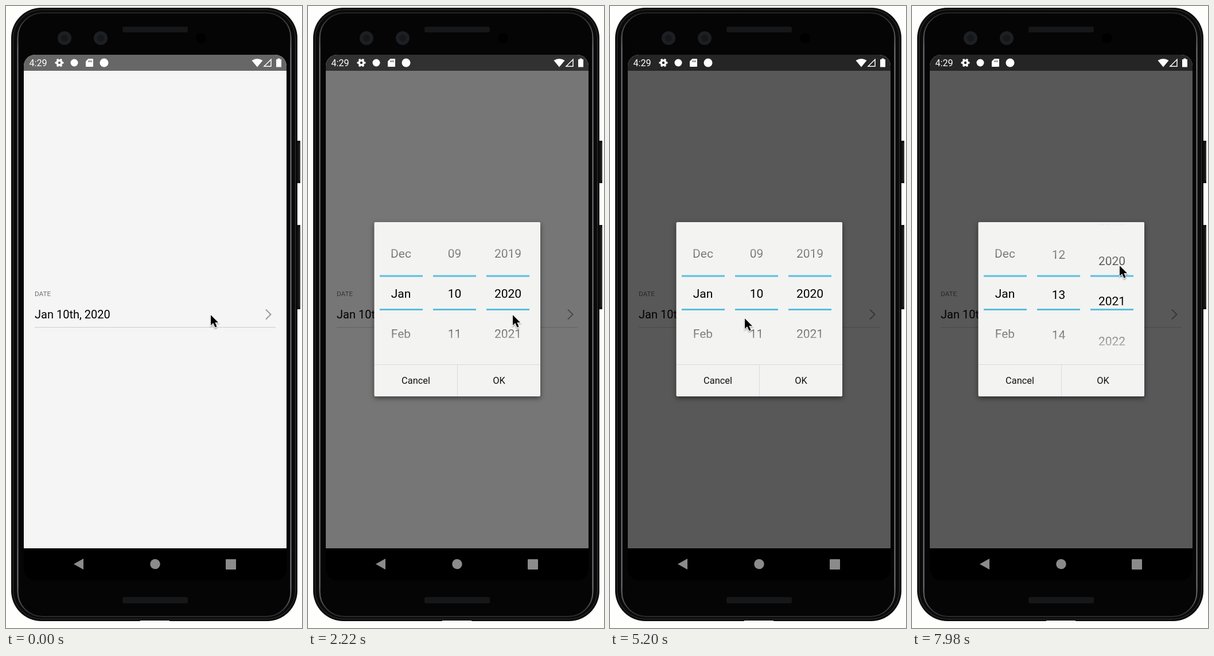
Animation, 516 px wide and 1085 px high, one loop 8000 ms. Source, as an HTML page:

```html
<!DOCTYPE html>
<html lang="en">
<head>
<meta charset="utf-8">
<title>Date picker</title>
<style>
  html, body { margin: 0; width: 100%; height: 100%; overflow: hidden; background: #fefefc; }
  svg { display: block; width: 516px; height: 1085px; font-family: Roboto, sans-serif; }
  .wheel { font-size: 21px; text-anchor: middle; }
  .button { font-size: 16.4px; text-anchor: middle; fill: #111; }
  #dialog { filter: drop-shadow(0 3px 4px rgba(0, 0, 0, .5)); }
  #cursor { filter: drop-shadow(0 2px 1px rgba(0, 0, 0, .3)); }
</style>
</head>
<body>
<svg viewBox="0 0 516 1085">
  <defs>
    <linearGradient id="fade" x2="0" y2="1">
      <stop stop-color="#f3f3f2"/>
      <stop offset=".453" stop-color="#f3f3f2" stop-opacity="0"/>
      <stop offset=".547" stop-color="#f3f3f2" stop-opacity="0"/>
      <stop offset="1" stop-color="#f3f3f2"/>
    </linearGradient>
    <linearGradient id="sheen" x2="0" y2="1">
      <stop stop-color="#22251d"/>
      <stop offset=".06" stop-color="#77777b"/>
      <stop offset=".95" stop-color="#77777b"/>
      <stop offset="1" stop-color="#2a2a2c"/>
    </linearGradient>
    <clipPath id="wheelArea"><rect x="116" y="379" width="289" height="245"/></clipPath>
    <clipPath id="screen"><rect x="31" y="85" width="458" height="917" rx="20"/></clipPath>
  </defs>

  <!-- phone body -->
  <path d="M506 235h7v74h-7zM506 382h7v147h-7z" fill="#111"/>
  <path d="M511.5 239v66M511.5 386v139" stroke="#444"/>
  <rect x="9" y="3" width="499" height="1070" rx="53" fill="#090a09"/>
  <rect x="12.5" y="6.5" width="492" height="1063" rx="50" fill="none" stroke="#343534"/>
  <rect x="20.5" y="12" width="476" height="1053" rx="43" fill="#050506" stroke="url(#sheen)" stroke-width="2"/>
  <path d="M234 1072.5h51" stroke="#fefefc"/>
  <g fill="#161718">
    <rect x="203" y="36" width="114" height="10" rx="3"/>
    <rect x="203" y="1031" width="114" height="11" rx="3"/>
    <circle cx="102" cy="56" r="9" stroke="#1c1f24" stroke-width="6"/>
    <circle cx="165" cy="56" r="9" stroke="#1c1f24" stroke-width="6"/>
  </g>
  <circle cx="340" cy="56" r="9"/>

  <!-- app -->
  <g clip-path="url(#screen)">
    <rect x="31" y="85" width="458" height="917"/>
    <rect x="31" y="85" width="458" height="861" fill="#f5f5f5"/>
    <rect x="31" y="85" width="458" height="28" fill="#676767"/>
    <text x="50" y="506" font-size="11.8" fill="#707070">DATE</text>
    <g id="row">
      <text x="50" y="545" font-size="20">Jan 10th, 2020</text>
      <path d="M453 529.5l8.5 8.5-8.5 8.5" fill="none" stroke="#999" stroke-width="2"/>
      <path d="M50 560.5H470" stroke="#cbcfc1"/>
    </g>
    <rect id="dim" x="31" y="85" width="458" height="861"/>
  </g>

  <!-- status and navigation bars -->
  <g fill="#fff">
    <text x="40.5" y="105" font-size="16.2">4:29</text>
    <circle cx="93" cy="99" r="4" fill="none" stroke="#fff" stroke-width="3.6"/>
    <circle cx="93" cy="99" r="6.3" fill="none" stroke="#fff" stroke-width="2.4" pathLength="12" stroke-dasharray="1" stroke-dashoffset=".5"/>
    <circle cx="119" cy="99" r="6.5"/>
    <path d="M143.500 92h7.500a1 1 0 0 1 1 1v12a1 1 0 0 1-1 1h-11a1 1 0 0 1-1-1v-8.500z"/>
    <path d="M143.500 96.500h7" stroke="#555" stroke-width="3" stroke-dasharray="1.2"/>
    <circle cx="171" cy="99" r="7.500"/>
    <path d="M438 106.500l-9.500-11.500q9.500-6 19 0z"/>
    <path d="M450 105.200h12v-12z" fill="none" stroke="#fff" stroke-width="1.500"/>
    <path d="M473.500 93v-1.500h4v1.500h2.500v13.500h-9v-13.500z"/>
  </g>
  <g fill="#8b8b8b">
    <path d="M118 973.500l17-9.500v19z"/>
    <circle cx="260" cy="973.500" r="8.700"/>
    <rect x="383" y="965" width="18" height="18" rx="1"/>
  </g>

  <g id="dialog">
    <rect x="115.500" y="377" width="289.500" height="304" rx="2" fill="#f3f3f2"/>
    <g id="wheels" clip-path="url(#wheelArea)"></g>
    <rect x="116" y="378" width="289" height="247" fill="url(#fade)"/>
    <path d="M125 471h261M125 529.500h261" stroke="#5abfdd" stroke-width="3" stroke-dasharray="75 18"/>
    <path d="M116 625.500h289M260.500 625v56" stroke="#dcdcd4"/>
    <text class="button" x="188" y="659">Cancel</text>
    <text class="button" x="333" y="659">OK</text>
  </g>
  <path id="cursor" d="M0 0v18l4.200-4 3.400 7.600 3-1.300-3.200-7.300h5.600z" stroke="#fff" stroke-width="2" paint-order="stroke"/>
</svg>
<script>
const LOOP = 8000, PITCH = 70, BASELINE = 509;
const $ = id => document.getElementById(id);
const set = (node, name, value) => node.setAttribute(name, value);
const move = (node, x, y) => set(node, "transform", `translate(${x} ${y})`);

// Progress from 0 to 1 between two times, linear or eased at both ends.
const ramp = (t, from, to) => Math.min(1, Math.max(0, (t - from) / (to - from)));
const ease = (t, from, to) => {
  const p = ramp(t, from, to);
  return p * p * (3 - 2 * p);
};

// Builds a column of labels; label(0) is the selected one.
function addWheel(x, first, last, label) {
  const wheel = document.createElementNS("http://www.w3.org/2000/svg", "g");
  set(wheel, "class", "wheel");
  for (let i = first; i <= last; i++)
    wheel.innerHTML += `<text x="${x}" y="${BASELINE + i * PITCH}">${label(i)}</text>`;
  $("wheels").append(wheel);
  return wheel;
}

addWheel(162, -1, 1, i => ["Dec", "Jan", "Feb"][i + 1]);
const days = addWheel(255.5, -2, 5, i => String(10 + i).padStart(2, "0"));
const years = addWheel(348.5, -2, 3, i => 2020 + i);

function draw(t) {
  // Tap on the row, then the dialog opens.
  const pressed = ramp(t, 1780, 1900) - ramp(t, 2020, 2200);
  const scale = 1 - .1 * (1 - ramp(t, 1900, 2110)) ** 2;
  set($("row"), "opacity", 1 - .4 * pressed);
  set($("dim"), "opacity", .585 * ramp(t, 1920, 2260) + (t < 2500 ? 0 : .055));
  set($("dialog"), "opacity", ramp(t, 1900, 2014));
  set($("dialog"), "transform", `translate(260.25 529) scale(${scale}) translate(-260.25 -529)`);

  // The pointer drags the day wheel, lets it coast, then drags the year wheel.
  const approach = ramp(t, 2800, 4100);
  const dayDrag = ease(t, 5600, 6320);
  const coast = ease(t, 6320, 6900);
  const cross = ease(t, 6600, 7240);
  const yearDrag = 57 * ease(t, 7500, 7980);
  move(days, 0, -148 * dayDrag - 60 * coast);
  move(years, 0, -yearDrag);
  move($("cursor"),
    357 - 122 * approach + 48 * ease(t, 5200, 6320) + 79 * cross,
    539 + 6 * approach - 140 * dayDrag + 105 * cross - yearDrag);
}

const start = performance.now();
(function tick() {
  draw((performance.now() - start) % LOOP);
  requestAnimationFrame(tick);
})();
</script>
</body>
</html>
```
